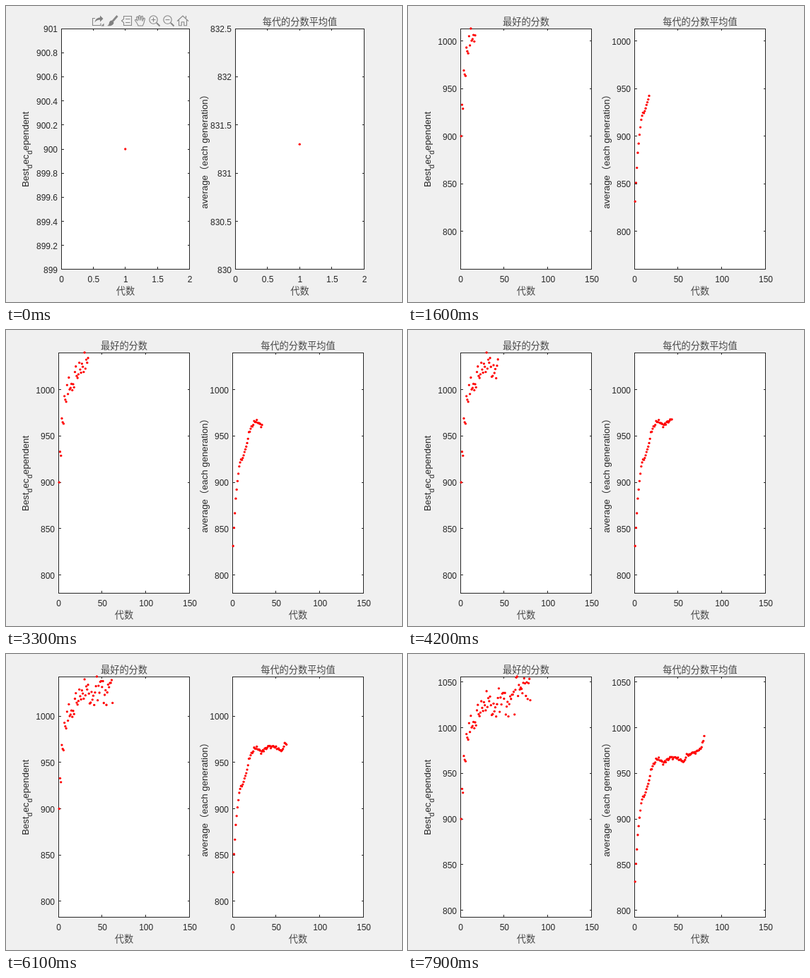
An HTML page that plays this animation: 560x420 px, repeating every 8000 ms.

```html
<!DOCTYPE html>
<html lang="zh">
<head>
<meta charset="utf-8">
<style>
html, body { margin: 0; width: 100%; height: 100%; overflow: hidden; background: #f0f0f0; }
svg { display: block; }
text { font: 300 12px "Liberation Sans", "Noto Sans CJK SC", "Noto Sans CJK", sans-serif; fill: #262626; text-anchor: middle; white-space: pre; }
text.label { font-size: 13.2px; }
text.soft { font-size: 13.2px; fill: #484848; }
text.end { text-anchor: end; }
.sub { font-size: 10.6px; }
.frame { fill: #fff; stroke: #262626; }
.ticks { fill: none; stroke: #262626; }
.dots { fill: #f00; }
.tools { fill: none; stroke: #868686; stroke-width: 1.1; }
.solid { fill: #808080; stroke: none; }
</style>
</head>
<body>
<svg id="stage" width="560" height="420" viewBox="0 0 560 420"></svg>
<script>
const STEP = 100, LOOP = 8000, COUNT = LOOP / STEP, TOP = 32, BOTTOM = 374;

// Generations that set a new best score
const records = [[1, 900], [2, 933], [4, 969], [7, 993], [10, 1005], [12, 1013], [19, 1019],
  [20, 1025], [24, 1029], [30, 1040], [44, 1043], [64, 1055], [65, 1056]];
// Turning points of the average score
const trend = [[1, 831.3], [2, 851], [4, 882.5], [6, 901.5], [8, 917], [10, 925], [11, 924],
  [17, 941.5], [19, 953], [25, 965.5], [28, 966], [33, 961], [41, 967], [52, 966],
  [56, 961], [60, 970], [73, 974], [77, 979], [80, 989.5]];

function random(i) {
  const v = Math.sin(i * 12.9898) * 43758.5453;
  return v - Math.floor(v);
}

// Between records, the best score falls short by a growing random amount
function bestAt(n) {
  const [gen, score] = records.findLast(r => r[0] <= n);
  return gen === n ? score : score - 1 - random(n) * Math.min(34, 4 + n * 0.6);
}

function averageAt(n) {
  const i = Math.max(1, trend.findIndex(p => p[0] >= n));
  const [[x0, y0], [x1, y1]] = [trend[i - 1], trend[i]];
  const jitter = (random(n + 100) - 0.5) * Math.min(3, (n - 1) / 8);
  return y0 + (y1 - y0) * (n - x0) / (x1 - x0) + jitter;
}

const series = f => Array.from({ length: COUNT }, (_, i) => f(i + 1));
const best = series(bestAt), average = series(averageAt);

const bestLabel = 'Best<tspan class="sub" dy="5">d</tspan><tspan dy="-5">ec</tspan>' +
  '<tspan class="sub" dy="5">d</tspan><tspan dy="-5">ependent</tspan>';
const averageLabel = 'average（each generation）';

const toolbar = `<g class="tools">
  <path d="M126 17.5h-3.500v10h11.500v-3"/>
  <path class="solid" d="M125.500 23.500c.6-4.600 3.500-7 7.500-7v-3l4.500 4.500-4.500 4.500v-3c-3.500 0-5.500 1-7.500 4zM138.500 24.500v4h-4z"/>
  <path d="M157.500 14l-7 8" stroke-width="2.800"/>
  <path class="solid" d="M149.500 20.500l3 3c-.5 3.500-4 5.500-9.500 4.500 2.500-1 2.500-2.500 3-4.500s2-3 3.500-3z"/>
  <path d="M166.500 14.500h11v13h-11v-4l-3-2.500 3-2.500zM169 18.500h6.500M169 23.500h6.500"/>
  <path d="M187 28c-1-3-2.500-5-4.500-7.500 0-2 2-1.500 3.500.8l-1.500-5c.5-1.800 2-1.300 2.500.2l1.200 4-.5-6c.6-1.400 2-1.200 2.300 0l.5 6 1-5.500c.8-1.300 2.200-.7 2 .6l-.7 6 1.700-4c1-1 2-.3 1.800 1-.7 4-1.300 6.500-3 9.400z"/>
  <circle cx="208.500" cy="19.500" r="5.700"/><path d="M205.500 19.500h6M208.500 16.500v6"/>
  <path d="M213 24l4.500 4.500" stroke-width="2"/>
  <circle cx="228.500" cy="19.500" r="5.700"/><path d="M225.500 19.500h6"/>
  <path d="M233 24l4.500 4.500" stroke-width="2"/>
  <path d="M242 21.500l8-7.500 8 7.500M244.500 20v7.800h3.700v-5h3.600v5h3.700V20M254.500 14v3"/>
</g>`;

const text = (x, y, s, cls = '') => `<text x="${x}" y="${y}" class="${cls}">${s}</text>`;

function range(low, high, step) {
  const list = [];
  for (let i = Math.ceil(low / step); i * step <= high + 1e-9; i++) list.push(+(i * step).toFixed(1));
  return list;
}

function panel({ left, right, labelX, data, n, title, label, xMax, xStep, low, high, yStep }) {
  const mid = (left + right) / 2;
  const px = v => left - 0.5 + v / xMax * (right - left + 0.5);
  const py = v => BOTTOM - (v - low) / (high - low) * (BOTTOM - TOP);
  const snap = v => Math.floor(v) + 0.5;
  let ticks = '', marks = '', dots = '';
  for (const v of range(0, xMax, xStep)) {
    const x = snap(px(v));
    ticks += `M${x} 373.5v-3.5M${x} 32.5v2.5`;
    marks += text(px(v) + 0.5, 391.5, v);
  }
  for (const v of range(low, high, yStep)) {
    const y = Math.min(373.5, snap(py(v)));
    ticks += `M${left} ${y}h3.5M${right} ${y}h-2.5`;
    marks += text(left - 5.5, py(v) + 5, v, 'end');
  }
  for (let i = 0; i < n; i++) dots += `<circle cx="${px(i + 1)}" cy="${py(data[i])}" r="1.65"/>`;
  return `<rect class="frame" x="${left}" y="32.5" width="${right - left}" height="341"/>
    <path class="ticks" d="${ticks}"/>${marks}<g class="dots">${dots}</g>
    ${text(mid, 27, title, 'soft')}${text(mid, 408.5, '代数', 'soft')}
    <g transform="translate(${labelX} 203.5) rotate(-90)">${text(0, 0, label, 'label')}</g>`;
}

function render(n) {
  const first = n === 1;
  const high = Math.max(...best.slice(0, n));
  const wide = high >= 1000;
  const axes = { n, xMax: 150, xStep: 50, low: high * 0.75, high, yStep: 50 };
  const a = { ...axes, left: wide ? 74.5 : 73.5, right: 259.5, labelX: wide ? 31.5 : 36.5,
    data: best, title: '最好的分数', label: bestLabel };
  const b = { ...axes, left: wide ? 320.5 : 319.5, right: 505.5, labelX: wide ? 285 : 290,
    data: average, title: '每代的分数平均值', label: averageLabel };
  if (first) {
    const start = { xMax: 2, xStep: 0.5 };
    Object.assign(a, start, { left: 78.5, labelX: 31.5, title: '', low: 899, high: 901, yStep: 0.2 });
    Object.assign(b, start, { left: 324.5, right: 506.5, labelX: 285, low: 830, high: 832.5, yStep: 0.5 });
  }
  return panel(a) + panel(b) + (first ? toolbar : '');
}

const stage = document.getElementById('stage');
let shown = 0;
function tick() {
  const n = Math.floor(performance.now() % LOOP / STEP) + 1;
  if (n !== shown) stage.innerHTML = render(shown = n);
  requestAnimationFrame(tick);
}
tick();
</script>
</body>
</html>
```
